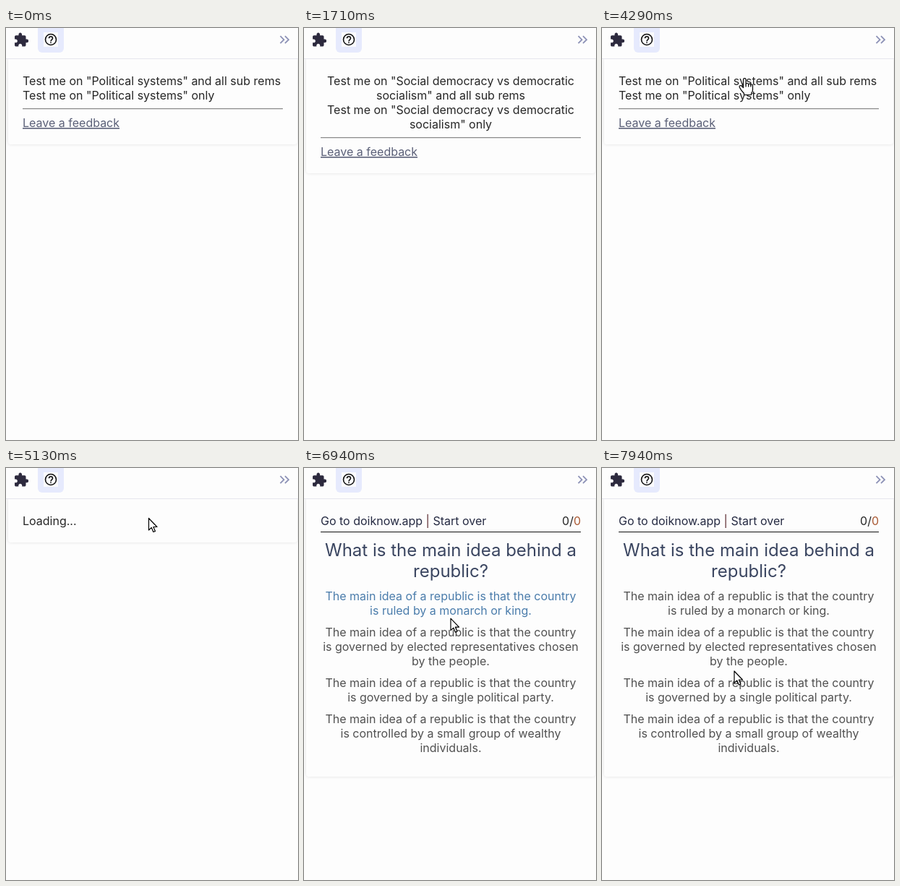
An HTML page that plays this animation: 404 px wide and 570 px high, repeating every 8 s.

```html
<!DOCTYPE html>
<html lang="en">
<head>
<meta charset="utf-8">
<title>Quiz panel</title>
<style>
html, body { margin: 0; width: 100%; height: 100%; overflow: hidden; background: #fdfdfd; }
svg { display: block; width: 404px; height: 570px; }
text { font: 16px Inter, sans-serif; font-optical-sizing: none; fill: #262626; white-space: pre; }
.mid { text-anchor: middle; }
.end { text-anchor: end; }
.link { fill: #5b6078; text-decoration: underline; }
.title { font-size: 24px; fill: #3a4560; }
.answer { fill: #505050; }
.hover { fill: #4a7cab; }
.head { fill: #252a42; }
#panel { fill: #fdfdfd; filter: drop-shadow(0 0 2px #0000001c); }
#cursor path { fill: #fff; stroke: #000; stroke-width: 1.2; stroke-linejoin: round; }
#cursor .line { fill: none; }
</style>
</head>
<body>
<svg viewBox="0 0 404 570">
  <rect id="panel" x="3" y="40" width="400" rx="4"/>
  <rect width="404" height="42" fill="#fdfdfd"/>
  <rect y="42" width="404" height="1" fill="#e6e6ee"/>
  <path transform="translate(10.2 5.6) scale(.91)" fill="#2d2a3e" d="M20.5 11H19V7c0-1.1-.9-2-2-2h-4V3.5C13 2.12 11.88 1 10.5 1S8 2.12 8 3.5V5H4c-1.1 0-1.99.9-1.99 2v3.8H3.5c1.49 0 2.7 1.21 2.7 2.7s-1.21 2.7-2.7 2.7H2V20c0 1.1.9 2 2 2h3.8v-1.5c0-1.49 1.21-2.7 2.7-2.7s2.7 1.21 2.7 2.7V22H17c1.1 0 2-.9 2-2v-4h1.5a2.5 2.5 0 0 0 0-5z"/>
  <rect x="44" y="-8" width="36" height="42" rx="6" fill="#e6eafd"/>
  <rect x="52" y="6" width="20" height="20" fill="#fbfbfd"/>
  <g fill="none" stroke="#111" stroke-width="1.6">
    <circle cx="62" cy="16" r="7.5"/>
    <path d="M59.5 14.3a2.5 2.5 0 0 1 5 0c0 1.8-2.5 1.8-2.5 4.2M62 19.4v1.6"/>
    <path stroke="#8c91b6" stroke-width="1.8" d="M379.5 11.2l5 5-5 5M386 11.2l5 5-5 5"/>
  </g>
  <g id="scene"></g>
  <g id="cursor"></g>
</svg>
<script>
const LOOP = 8000, TICK = 1000 / 15;
const $ = id => document.getElementById(id);

const text = (x, y, s, cls = "") => `<text x="${x}" y="${y}" class="${cls}">${s}</text>`;
const lines = (y, list, cls, step = 20) =>
  list.map((s, i) => text(203, y + i * step, s, "mid " + cls)).join("");

const cursors = {
  arrow: `<path d="M0 0V16.5l3.8-3.6 2.6 6.1 2.6-1.1-2.6-5.9H11.5z"/>`,
  hand: `<path d="M-2 13V2a1.8 1.8 0 0 1 3.6 0V8.5q0-1.5 1.7-1.5t1.8 1.8q0-1.2 1.6-1.2t1.7 1.8q0-1 1.4-.9t1.2 2V16q0 3-2 5v2h-10v-2q-4-4-6-8-1-2 .5-2.7t2.8 1z"/>
    <path class="line" d="M1.6 8.5V12M5.1 8.8V12M8.4 9.4V12"/>`,
  beam: `<path class="line" d="M-3-11h2l1 1 1-1h2M0-10V8M-3 9h2l1-1 1 1h2"/>`
};

// Pointer path: time, x, y
const path = [
  [3730, 86, 137], [4130, 202, 84], [4260, 197.5, 69.5],
  [6470, 197.5, 69.5], [6740, 201, 158], [6930, 203, 208], [7130, 203, 212],
  [7410, 203, 212], [7670, 192, 250], [7930, 183, 281]
];

const answers = [
  ["The main idea of a republic is that the country", "is ruled by a monarch or king."],
  ["The main idea of a republic is that the country", "is governed by elected representatives chosen", "by the people."],
  ["The main idea of a republic is that the country", "is governed by a single political party."],
  ["The main idea of a republic is that the country", "is controlled by a small group of wealthy", "individuals."]
];

function pointer(t) {
  t = Math.floor((t - 5) / TICK) * TICK + 5;
  const i = path.findIndex(p => p[0] > t);
  if (i == 0) return path[0].slice(1);
  if (i < 0) return path.at(-1).slice(1);
  const [a, b] = [path[i - 1], path[i]], k = (t - a[0]) / (b[0] - a[0]);
  return [1, 2].map(n => a[n] + (b[n] - a[n]) * k);
}

function cursorKind(t, y) {
  if (t < 4930) return y > 143 || y > 104 && y < 122 ? "arrow" : "hand";
  if (t < 5130) return "beam";
  if (t < 5530) return "arrow";
  if (y < 84) return "hand";
  if (y > 100 && y < 157) return "beam";
  return y > 167 && y < 207 || y > 217 && y < 277 ? "hand" : "arrow";
}

function menu(topic) {
  const long = topic.length > 1, drop = long ? 40 : 0;
  const all = " and all sub rems", open = 'Test me on "';
  const items = long
    ? lines(79, [open + topic[0], topic[1] + '"' + all, open + topic[0], topic[1] + '" only'], "")
    : text(23, 79, `${open}${topic}"${all}`) + text(23, 99, `${open}${topic}" only`);
  return [161 + drop, items +
    `<path d="M23 ${111.5 + drop}h360" stroke="#8c8c8c"/><path d="M23 ${112.5 + drop}h360" stroke="#dedede"/>` +
    text(23, 137 + drop, "Leave a feedback", "link")];
}

function quiz(y) {
  const hovered = y > 167 && y < 209 ? 0 : y > 217 && y < 279 ? 1 : -1;
  let top = 183, body = "";
  answers.forEach((a, i) => {
    body += lines(top, a, i == hovered ? "hover" : "answer");
    top += a.length * 20 + 10;
  });
  return [427,
    text(23, 79, 'Go to doiknow.app <tspan fill="#5c2a30">|</tspan> Start over', "head") +
    text(383, 79, '0/<tspan fill="#aa5a34">0</tspan>', "end") +
    `<path d="M23 88.5h360" stroke="#111"/>` +
    lines(122, ["What is the main idea behind a", "republic?"], "title", 29) + body];
}

function scene(t, y) {
  if (t >= 5460) return quiz(y);
  if (t >= 4930) return [103, text(23, 79, "Loading...")];
  if (t >= 1710 && t < 2990) return menu(["Social democracy vs democratic", "socialism"]);
  return menu([t >= 500 && t < 1710 ? "Socialism" : "Political systems"]);
}

let start, shown;
function draw(now) {
  start ??= now;
  const t = (now - start) % LOOP, [x, y] = pointer(t);
  const [bottom, content] = scene(t, y);
  if (content != shown) {
    $("scene").innerHTML = shown = content;
    $("panel").setAttribute("height", bottom - 40);
  }
  $("cursor").innerHTML = t < 3730 ? "" : cursors[cursorKind(t, y)];
  $("cursor").setAttribute("transform", `translate(${x} ${y})`);
  requestAnimationFrame(draw);
}
requestAnimationFrame(draw);
</script>
</body>
</html>
```
